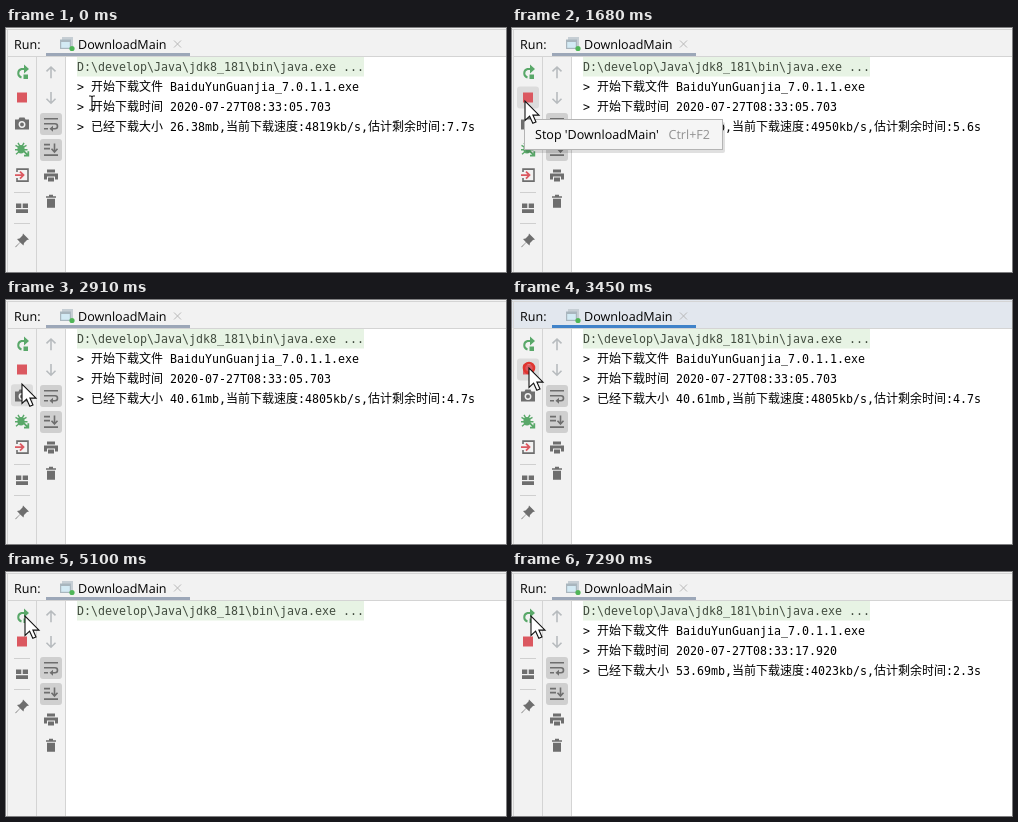
An HTML page for the animation above (8000 ms loop, 500 px wide and 244 px high).

```html
<!DOCTYPE html>
<html lang="zh">
<head>
<meta charset="utf-8">
<title>Run console</title>
<style>
html, body { margin: 0; height: 100%; overflow: hidden; background: #fff; }
svg { display: block; width: 100vw; height: 100vh; }
text { white-space: pre; }
.ui { font: 12.55px "Open Sans", "Noto Sans", sans-serif; text-rendering: geometricPrecision; }
.log { font: 11.63px "DejaVu Sans Mono", "Noto Sans Mono", monospace; }
.cjk { font: 500 12px "Noto Sans CJK SC", "Noto Sans CJK", sans-serif; }
.off { --g: #b9b9b9; --r: #b9b9b9; --n: #b9b9b9; }
</style>
</head>
<body>
<svg viewBox="0 0 500 244">
  <rect width="500" height="244" fill="#fff"/>
  <path d="M0 0H500V28H60V244H0z" fill="#f2f2f2"/>
  <rect id="header" width="500" height="28"/>
  <path d="M0 1.5H500M1.5 2V244M1 28.5H500M30.5 29V244M59.5 29V244" stroke="#d4d4d4" fill="none"/>
  <text class="ui" x="8" y="20.5">Run:</text>
  <rect id="underline" x="40" y="25" width="144" height="3"/>
  <path d="M56 9H67V18H56z" fill="#c6ced4"/>
  <path d="M54 11.5H65V21H54z" fill="#a9b6be"/>
  <path d="M55.2 14H63.8V19.8H55.2z" fill="#d3eaf4"/>
  <circle id="dot" cx="66" cy="20.5" r="2.6" fill="#4fb558"/>
  <text class="ui" x="72" y="20.5">DownloadMain</text>
  <path d="M168 12.5l7 7m0-7l-7 7" stroke="#b8b8b8"/>
  <rect id="hover" x="5" width="22" height="22" rx="3" fill="#dcdcdc"/>
  <g id="bar"></g>
  <g id="console"></g>
  <g id="tip">
    <rect x="14" y="94" width="199" height="31" rx="2" fill="#000" opacity=".12"/>
    <rect x="12.5" y="91.5" width="198" height="30" fill="#f5f5f5" stroke="#b4b4b4"/>
    <text class="ui" x="23" y="111">Stop 'DownloadMain'</text>
    <text class="ui" x="156.5" y="111" fill="#919191">Ctrl+F2</text>
  </g>
  <circle id="ring" r="5" fill="none" stroke="#e0352f" stroke-width="2.6"/>
  <g id="cursor">
    <path id="beam" d="M-3 -7h2l1 1l1-1h2M0 -6V6M-3 7h2l1-1l1 1h2" fill="none" stroke="#222" stroke-width="1.2"/>
    <path id="arrow" d="M0 0V19.5L4.6 15.2L7.8 22.3L11 20.9L7.9 14.1H14z" fill="#fff" stroke="#111" stroke-width="1.1"/>
  </g>
</svg>
<script>
const $ = id => document.getElementById(id);
const LOOP = 8000, CLICK = 3450, STOPPED = 3540, RESTART = 4950;
const GREY = 'var(--n,#6e6e6e)', GREEN = 'var(--g,#59a869)', RED = 'var(--r,#db5860)', PALE = '#b7bbbe';

// Icons are drawn around their own centre.
const line = (d, color, w = 1.8) => `<path d="${d}" fill="none" stroke="${color}" stroke-width="${w}"/>`;
const fill = (d, color) => `<path d="${d}" fill="${color}"/>`;
const icon = {
  rerun: line('M3 -3H-.5A4.4 4.4 0 0 0 -.5 5.5', GREEN, 2) + fill('M2 -7.5L7 -3L2 1.5zM1.5 2.5h4.5v4.5h-4.5z', GREEN),
  stop: fill('M-5 -5H5V5H-5z', RED),
  camera: fill('M-7 -4H-3.5L-2.5 -6H2.5L3.5 -4H7V6H-7z', GREY) +
    `<circle cy="1" r="2.7" fill="${GREY}" stroke="#f2f2f2" stroke-width="1.5"/>`,
  bug: `<ellipse cx="-1" rx="3.6" ry="4.2" fill="${GREEN}"/>` +
    line('M-6.5 -4L-3 -2M-7 .5H-3M-6 5L-3 2.5M-4 -6.5L-2 -3M2 -6.5L0 -3M4.5 -4L1 -2M2 .5H5.5', GREEN, 1.4) +
    line('M1 1L6 6M6.3 2V6.3H2', GREEN, 1.8),
  exit: line('M-5 -3V-6H6V6H-5V3', GREY, 1.6) + line('M-7 0H1M-2 -3.5L1.5 0L-2 3.5', RED, 1.8),
  layout: fill('M-6 -4.5H-.7V0H-6zM.7 -4.5H6V0H.7zM-6 1.2H6V5H-6z', GREY),
  pin: fill('M1 -7L7 -1L5 -.5L2 2.5L1.5 5L-1.8 2L-6 6.5L-6.8 6.8L-6.5 6L-2 1.8L-5 -1.5L-2.5 -2L.5 -5z', GREY),
  up: line('M0 6V-5M-4.5 -.8L0 -5.2L4.5 -.8', PALE, 1.6),
  down: line('M0 -6V5M-4.5 .8L0 5.2L4.5 .8', PALE, 1.6),
  wrap: line('M-7 -5H7M-7 0H4A2.5 2.5 0 0 1 4 5H1M-7 5H-3', GREY, 1.6) + fill('M2 2L-1.5 5L2 8z', GREY),
  end: line('M-7 -5H-1M-7 -1H-1M-7 5.5H7M3.5 -6V2M.5 -.8L3.5 2.4L6.5 -.8', GREY, 1.6),
  print: fill('M-4 -6H4V-3H-4zM-7 -2H7V4H4V1H-4V4H-7zM-3 2H3V6H-3z', GREY),
  trash: fill('M-5 -5H-2V-6.5H2V-5H5V-3.5H-5zM-4 -2.5H4V6.5H-4z', GREY)
};
const put = (name, x, y) => `<g transform="translate(${x} ${y})">${icon[name]}</g>`;
const column = (names, x, y) => names.map((n, i) => put(n, x, y + i * 25.8)).join('');

$('bar').innerHTML = put('rerun', 16, 44) +
  `<g id="live">${put('stop', 16, 69.5)}<g id="extra">${column(['camera', 'bug', 'exit'], 16, 95.5)}</g></g>
  <g id="low">${line('M8 164.5H24M8 195.5H24', '#cfcfcf', 1)}${put('layout', 16, 180)}${put('pin', 16, 212.5)}</g>
  <rect x="34" y="85" width="22" height="22" rx="3" fill="#cfcfcf"/>
  <rect x="34" y="111" width="22" height="22" rx="3" fill="#cfcfcf"/>
  ${column(['up', 'down', 'wrap', 'end', 'print', 'trash'], 45, 44.2)}`;

const command = 'D:\\develop\\Java\\jdk8_181\\bin\\java.exe ...';
const start = time => ['> 开始下载文件 BaiduYunGuanjia_7.0.1.1.exe', '> 开始下载时间 2020-07-27T08:33:' + time];
// [from ms, downloaded mb, kb/s, seconds left]
const progress = [
  [0, 26.38, 4819, 7.7], [705, 31.08, 4813, 6.7], [1650, 35.92, 4950, 5.6],
  [2610, 40.61, 4805, 4.7], [3480, 46.37, 5901, 2.8],
  [6360, 49.76, 3471, 3.8], [7260, 53.69, 4023, 2.3]
];

function logLines(t) {
  const lines = [command];
  if (t >= RESTART && t < 5430) return lines;
  lines.push(...start(t < RESTART ? '05.703' : '17.920'));
  if (t < RESTART || t >= 6360) {
    const [, mb, speed, left] = progress.filter(p => p[0] <= t).pop();
    lines.push(`> 已经下载大小 ${mb}mb,当前下载速度:${speed}kb/s,估计剩余时间:${left}s`);
  }
  if (t >= STOPPED && t < RESTART) lines.push('Process finished with exit code -1');
  return lines;
}

const markup = s => s.replace(/>/g, '&gt;').replace(/[\u4e00-\u9fff]+/g, '<tspan class="cjk">$&</tspan>');
const lineColor = s => s === command ? '#434d40' : s.startsWith('Process') ? '#10107f' : '#000';
let shown = '';
function drawLog(t) {
  const lines = logLines(t), key = lines.join('\n');
  if (key === shown) return;
  shown = key;
  $('console').innerHTML = '<rect x="71" y="29" width="287" height="19.5" fill="#e7f3e4"/>' +
    lines.map((s, i) =>
      `<text class="log" x="71" y="${42.6 + i * 20.15}" fill="${lineColor(s)}">${markup(s)}</text>`).join('');
}

// Pointer stops: [ms, x, y]
const path = [
  [30, 86, 75], [450, 1, 58], [660, 1, 58], [900, 13, 73], [2550, 13, 73], [2880, 16, 84],
  [2970, 16, 84], [3300, 17, 68], [3570, 17, 68], [3810, 19, 44], [LOOP, 19, 44]
];
function pointer(t) {
  const i = path.findIndex(p => p[0] >= t);
  if (i < 1) return path[0].slice(1);
  const [t0, x0, y0] = path[i - 1], [t1, x1, y1] = path[i];
  const k = (t - t0) / (t1 - t0), e = k * k * (3 - 2 * k);
  return [x0 + (x1 - x0) * e, y0 + (y1 - y0) * e];
}

const within = (t, a, b) => t >= a && t < b;
const set = (id, name, value) => $(id).setAttribute(name, value);
const show = (id, on) => set(id, 'visibility', on ? 'visible' : 'hidden');
const clamp = v => Math.max(0, Math.min(1, v));

function draw(t) {
  const stopped = within(t, STOPPED, RESTART), focused = within(t, CLICK, RESTART), fresh = t >= RESTART;
  drawLog(t);
  set('header', 'fill', focused ? '#e2e7ee' : '#f2f2f2');
  set('underline', 'fill', focused ? '#4083c9' : '#9ca7b8');
  show('dot', !stopped);
  show('extra', !fresh);
  set('low', 'transform', `translate(0 ${fresh ? -78 : 0})`);
  set('live', 'class', stopped ? 'off' : '');

  const [x, y] = pointer(t);
  const move = `translate(${x} ${y})`;
  set('cursor', 'transform', move);
  show('beam', x > 60);
  show('arrow', x <= 60);
  set('ring', 'transform', move);
  show('ring', within(t, CLICK, 3570) || within(t, 4020, 4220));

  // The toolbar button under the pointer is highlighted.
  show('hover', within(x, 5, 27) && t < 4500);
  set('hover', 'y', 33 + 25.6 * Math.floor((y - 32) / 25.6));
  set('tip', 'opacity', Math.min(clamp((t - 1300) / 80), clamp((2400 - t) / 60)));
}

const begin = performance.now();
(function tick() {
  draw((performance.now() - begin) % LOOP);
  requestAnimationFrame(tick);
})();
</script>
</body>
</html>
```
